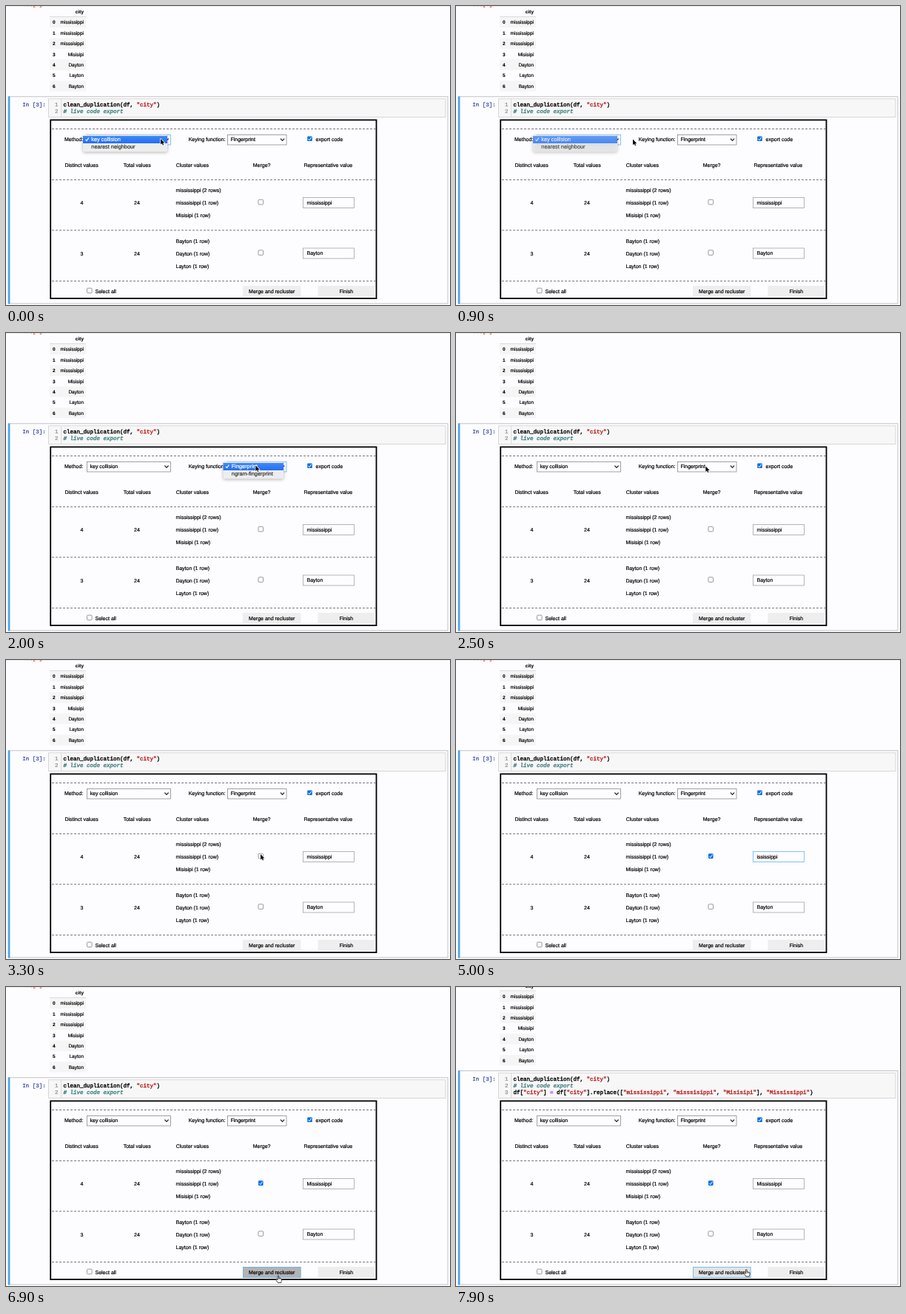
Animation of 600 by 405 pixels, one loop 8 s. Source, as an HTML page with a canvas:

```html
<!DOCTYPE html>
<html lang="en">
<head>
<meta charset="utf-8">
<title>Clean duplication</title>
<style>
html, body { margin: 0; width: 100%; height: 100%; overflow: hidden; background: #fdfcff; }
canvas { display: block; width: 600px; height: 405px; }
</style>
</head>
<body>
<canvas id="stage"></canvas>
<script>
const W = 600, H = 405, LOOP = 8000;
const canvas = document.getElementById('stage');
const ctx = canvas.getContext('2d');
const dpr = window.devicePixelRatio || 1;
canvas.width = W * dpr;
canvas.height = H * dpr;

const SANS = '"Liberation Sans", Arial, sans-serif';
const MONO = '7.5px "Liberation Mono", monospace';
const UI = '7px ' + SANS;
const PAPER = '#fdfcff', FOCUS = '#64b5f6', BORDER = '#8c8c8c', RED = '#ba2121';
const CHAR = 4.5;   // width of one code character

// Moments at which the state changes, in ms
const CLOSE_METHOD = 870, OPEN_KEYING = 1500, CLOSE_KEYING = 2300;
const TICK = 3450, FOCUS_INPUT = 4350, ERASE = 4750, TYPE = 5350;
const PRESS = 6650, RELEASE = 6950, EXPORT = 7050;

// Pointer path: time, x, y of the hot spot
const PATH = [
  [0, 209, 180], [150, 209, 180], [800, 239, 180.6], [950, 239, 180.6],
  [1350, 337.3, 179.3], [2450, 337.3, 179.3], [3200, 344, 263], [3500, 344, 263],
  [4100, 408, 267], [5950, 408, 267], [6600, 367, 391], [7150, 367, 391],
  [7750, 391.5, 382.5], [8000, 391.5, 382.5]
];

const clamp = v => Math.max(0, Math.min(1, v));

function pointerAt(t) {
  let i = 1;
  while (i < PATH.length - 1 && PATH[i][0] < t) i++;
  const [t0, x0, y0] = PATH[i - 1], [t1, x1, y1] = PATH[i];
  let k = clamp((t - t0) / (t1 - t0));
  k = k * k * (3 - 2 * k);
  return [x0 + (x1 - x0) * k, y0 + (y1 - y0) * k];
}

// A hairline stroke of width "heft" thickens the small type
function text(s, x, y, { font = UI, color = '#000', align = 'left', heft = 0.2 } = {}) {
  ctx.font = font;
  ctx.fillStyle = ctx.strokeStyle = color;
  ctx.textAlign = align;
  ctx.fillText(s, x, y);
  ctx.lineWidth = heft;
  ctx.strokeText(s, x, y);
}

function fill(x, y, w, h, color) {
  ctx.fillStyle = color;
  ctx.fillRect(x, y, w, h);
}

function frame(x, y, w, h, color, line = 0.8) {
  ctx.strokeStyle = color;
  ctx.lineWidth = line;
  ctx.strokeRect(x, y, w, h);
}

function poly(points, color, line) {
  ctx.beginPath();
  points.forEach(([x, y], i) => i ? ctx.lineTo(x, y) : ctx.moveTo(x, y));
  ctx.strokeStyle = color;
  ctx.lineWidth = line;
  ctx.stroke();
}

function tickMark(x, y, color, line = 1) {
  poly([[x, y + 2.3], [x + 1.6, y + 4], [x + 4.3, y]], color, line);
}

function checkbox(x, y, on) {
  ctx.beginPath();
  ctx.roundRect(x, y, 6.6, 6.6, 1.2);
  ctx.fillStyle = on ? '#0b6fe4' : PAPER;
  ctx.fill();
  if (on) {
    tickMark(x + 1.2, y + 1.3, '#fff');
  } else {
    ctx.strokeStyle = '#6f6f6f';
    ctx.lineWidth = 0.7;
    ctx.stroke();
  }
}

function select(x, w, label, focused) {
  fill(x, 174.5, w, 13.5, PAPER);
  frame(x, 174.5, w, 13.5, focused ? FOCUS : BORDER);
  text(label, x + 4, 183.3);
  const c = x + w - 5.5;
  poly([[c - 2.6, 179.6], [c, 182.4], [c + 2.6, 179.6]], '#222', 1.3);
}

function input(y, value, focused) {
  fill(401.5, y, 69, 14, PAPER);
  frame(401.5, y, 69, 14, focused ? FOCUS : '#a4a4a4');
  text(value, 406.5, y + 9.4);
}

function button(x, w, label, color, focused) {
  fill(x, 379, w, 15, color);
  if (focused) frame(x + 0.4, 379.4, w - 0.8, 14.2, FOCUS);
  text(label, x + w / 2, 389, { align: 'center' });
}

function popup(x, w, items, alpha) {
  if (alpha <= 0) return;
  ctx.save();
  ctx.globalAlpha = alpha;
  ctx.shadowColor = 'rgba(0,0,0,.3)';
  ctx.shadowBlur = 4 * dpr;
  ctx.shadowOffsetY = dpr;
  ctx.beginPath();
  ctx.roundRect(x, 174.6, w, 23, 2.5);
  ctx.fillStyle = '#ededed';
  ctx.fill();
  ctx.shadowColor = 'transparent';
  const blue = ctx.createLinearGradient(0, 176, 0, 186);
  blue.addColorStop(0, '#4089f9');
  blue.addColorStop(1, '#2270f4');
  fill(x, 176, w, 10, blue);
  const font = '7.35px ' + SANS;
  tickMark(x + 3.5, 178.5, '#fff', 1.1);
  text(items[0], x + 11.3, 183.4, { font, color: '#fff' });
  text(items[1], x + 11.3, 192.8, { font, color: '#333' });
  ctx.restore();
}

function code(x, y, parts) {
  for (const [s, color = '#000', style = ''] of parts) {
    text(s, x, y, { font: `${style} ${MONO}`, color, heft: 0.4 });
    x += s.length * CHAR;
  }
}

function table(dy) {
  const cell = '6.5px ' + SANS, head = 'bold ' + cell;
  text('Out[2]:', 22.3, dy, { font: MONO, color: '#d84315' });
  text('city', 105, 9.7 + dy, { font: head, align: 'right', heft: 0.1 });
  fill(59, 14 + dy, 49, 0.5, '#aaa');
  ['mississippi', 'mississippi', 'misssisippi', 'Misisipi', 'Dayton', 'Layton', 'Bayton']
    .forEach((name, i) => {
      const y = 22 + i * 14.4 + dy;
      if (i % 2 === 0) fill(59, y - 7.2, 49, 14.4, '#f5f5f5');
      text(i, 66.5, y + 2.3, { font: head, align: 'right', heft: 0.1 });
      text(name, 105, y + 2.3, { font: cell, align: 'right' });
    });
}

function codeCell(dy, exported) {
  frame(3, 122.8 + dy, 594, 280.2 - dy, '#b5b5b5');
  fill(3, 122.5 + dy, 2.4, 281 - dy, '#42a5f5');
  fill(57.5, 125.8 + dy, 536.5, 24.7 - dy, '#f7f7f7');
  frame(57.5, 125.8 + dy, 536.5, 24.7 - dy, '#cfcfcf');
  fill(74.4, 126 + dy, 0.7, 24.3 - dy, '#cfcfcf');
  text('In [3]:', 22.3, 136 + dy, { font: MONO, color: '#303f9f' });

  const y = 136 + dy, x = 77.5;
  for (let i = 0; i < (exported ? 3 : 2); i++) {
    text(i + 1, 70.5, y + i * 9.2, { font: MONO, color: '#888', align: 'right' });
  }
  code(x, y, [['clean_duplication(df, '], ['"city"', RED], [')']]);
  code(x, y + 9.2, [['# live code export', '#408080', 'italic']]);
  if (exported) {
    code(x, y + 18.4, [
      ['df['], ['"city"', RED], ['] '], ['=', '#aa22ff'], [' df['], ['"city"', RED],
      ['].replace(['], ['"mississippi"', RED], [', '], ['"misssisippi"', RED], [', '],
      ['"Misisipi"', RED], ['], '], ['"Mississippi"', RED], [')']
    ]);
  }
}

function cluster(y, count, names, checked) {
  text(count, 102.5, y + 2.3, { align: 'center' });
  text('24', 177, y + 2.3, { align: 'center' });
  names.forEach((s, i) => text(s, 229.5, y + 2.3 + (i - 1) * 17.1));
  checkbox(341, y - 4.5, checked);
}

function panel(t) {
  fill(60, 154.5, 440.5, 242, PAPER);
  frame(60.2, 154.4, 440.3, 241.7, '#000', 1.8);
  ctx.setLineDash([3, 2]);
  for (const y of [166.5, 235.4, 303.8, 372.6]) poly([[62, y], [499.5, y]], '#555', 0.8);
  ctx.setLineDash([]);

  text('Method:', 79, 183.3);
  select(109.5, 113, 'key collision', t < CLOSE_METHOD + 150);
  text('Keying function:', 246.7, 183.3);
  select(299.5, 79.5, 'Fingerprint', t >= OPEN_KEYING && t < CLOSE_KEYING + 200);
  checkbox(407.2, 176.5, true);
  text('export code', 418.5, 183.3);

  [['Distinct values', 79.5], ['Total values', 158.7], ['Cluster values', 229.7],
   ['Merge?', 333.7], ['Representative value', 402.4]].forEach(([s, x]) => text(s, x, 217.5));

  cluster(266.8, '4', ['mississippi (2 rows)', 'misssisippi (1 row)', 'Misisipi (1 row)'], t >= TICK);
  cluster(335.3, '3', ['Bayton (1 row)', 'Dayton (1 row)', 'Layton (1 row)'], false);

  const first = t < ERASE ? 'm' : t < TYPE ? '' : 'M';
  input(259.5, first + 'ississippi', t >= FOCUS_INPUT && t < PRESS);
  input(328, 'Bayton', false);

  checkbox(109.5, 382.2, false);
  text('Select all', 120.5, 389);
  const pressed = t >= PRESS && t < RELEASE;
  button(320, 78.5, 'Merge and recluster', pressed ? '#b3b3b3' : t >= RELEASE ? '#e3e3e3' : '#eee', t >= PRESS);
  button(421.5, 76.5, 'Finish', '#eee', false);

  popup(104, 114, ['key collision', 'nearest neighbour'], 1 - clamp((t - CLOSE_METHOD) / 150));
  if (t >= OPEN_KEYING) {
    popup(293.5, 81.5, ['Fingerprint', 'ngram-fingerprint'], 1 - clamp((t - CLOSE_KEYING) / 150));
  }
}

const ARROW = new Path2D('M0 0V7.6L1.8 6L2.9 8.6L4.1 8.1L3 5.6H5.3Z');
const HAND = new Path2D('M0 .6Q.9 -.3 1.6 .7V3.4Q2.6 2.8 3 3.7Q4 3.2 4.4 4.1Q5.6 3.8 5.6 5V6.6' +
  'Q5.4 7.8 4.8 8.6V9.6H.4Q-.6 8 -2 6.2Q-2.8 5 -1.9 4.8Q-1 4.7 0 5.8Z');

function pointer(t) {
  // The pointer hides while the field is being edited
  if (t >= FOCUS_INPUT + 100 && t < 5950) return;
  const [x, y] = pointerAt(t);
  ctx.save();
  ctx.translate(x, y);
  ctx.lineJoin = 'round';
  if (y > 379) {
    ctx.fillStyle = '#fff';
    ctx.fill(HAND);
    ctx.strokeStyle = '#111';
    ctx.lineWidth = 0.8;
    ctx.stroke(HAND);
    poly([[1.6, 3.5], [1.6, 5.3]], '#111', 0.5);
    poly([[3, 3.8], [3, 5.3]], '#111', 0.5);
    poly([[4.4, 4.2], [4.4, 5.4]], '#111', 0.5);
  } else if (x > 401.5 && y > 259.5 && y < 273.5) {
    poly([[0, -4], [0, 4]], '#222', 0.8);
    poly([[-1.7, -4.5], [0, -4], [1.7, -4.5]], '#222', 0.7);
    poly([[-1.7, 4.5], [0, 4], [1.7, 4.5]], '#222', 0.7);
  } else {
    ctx.strokeStyle = '#fff';
    ctx.lineWidth = 1.4;
    ctx.stroke(ARROW);
    ctx.fillStyle = '#000';
    ctx.fill(ARROW);
  }
  ctx.restore();
}

function draw(t) {
  ctx.setTransform(dpr, 0, 0, dpr, 0, 0);
  ctx.textBaseline = 'alphabetic';
  ctx.textRendering = 'geometricPrecision';
  fill(0, 0, W, H, PAPER);
  fill(0, 0, W, 1, '#ececec');
  const exported = t >= EXPORT;
  const dy = exported ? -9.2 : 0;
  table(dy);
  codeCell(dy, exported);
  panel(t);
  pointer(t);
}

const start = performance.now();
function loop() {
  draw((performance.now() - start) % LOOP);
  requestAnimationFrame(loop);
}
loop();
</script>
</body>
</html>
```
